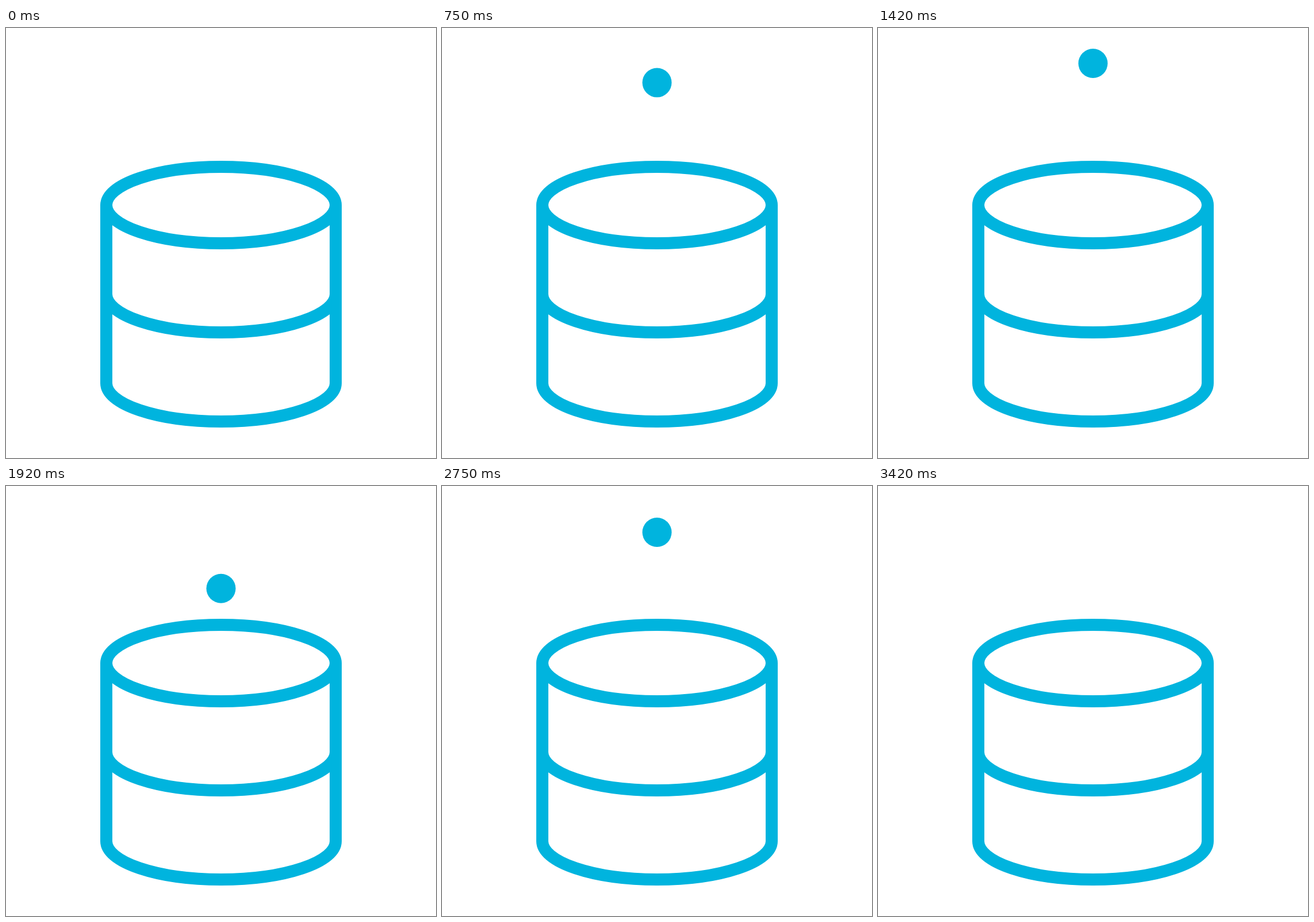
An HTML page with a canvas for the animation above (3460 ms loop, 748 px wide and 748 px high).

```html
<!DOCTYPE html>
<html lang="en">
<head>
<meta charset="utf-8">
<title>Database filling</title>
<style>
  html, body { margin: 0; width: 100%; height: 100%; overflow: hidden; background: #fff; }
  canvas { display: block; width: 748px; height: 748px; }
</style>
</head>
<body>
<canvas id="stage" width="748" height="748"></canvas>
<script>
const ctx = document.getElementById('stage').getContext('2d');
const BLUE = '#00b4de';
const LOOP = 3460;
const TICK = 1000 / 24;
const CX = 374, RX = 199.5, RY = 66.5;
const TOP = 308, MIDDLE = 463, BOTTOM = 618;
const DOT = { y: 61.5, radius: 25.5, travel: 205, fallSteps: 14.7 };

// Times are in animation steps, about 20 per second.
const DROPS = [
  { appear: 4.4, fall: 11.1 },
  { appear: 24, fall: 31 },
  { appear: 44.8, fall: 52.1 }
];
const FADE_STEPS = 4.9;

const clamp = v => Math.min(1, Math.max(0, v));
const easeInOut = p => (1 - Math.cos(Math.PI * p)) / 2;

// 20 steps per second, held on a 24 per second clock.
function stepAt(ms) {
  const tick = Math.floor((ms + 4.9) / TICK);
  return Math.floor(tick * 5 / 6 + 0.75);
}

function drawDrop(drop, step) {
  const alpha = clamp((step - drop.appear) / FADE_STEPS);
  const progress = clamp((step - drop.fall) / DOT.fallSteps);
  if (alpha === 0 || progress === 1) return;
  ctx.globalAlpha = alpha;
  ctx.fillStyle = BLUE;
  ctx.beginPath();
  ctx.arc(CX, DOT.y + DOT.travel * easeInOut(progress), DOT.radius, 0, 2 * Math.PI);
  ctx.fill();
  ctx.globalAlpha = 1;
}

function drawCylinder() {
  ctx.strokeStyle = BLUE;
  ctx.lineWidth = 21;
  ctx.fillStyle = '#fff';

  ctx.beginPath();
  ctx.ellipse(CX, TOP, RX, RY, 0, 0, 2 * Math.PI);
  ctx.fill();
  ctx.stroke();

  ctx.beginPath();
  ctx.moveTo(CX + RX, TOP);
  ctx.lineTo(CX + RX, BOTTOM);
  ctx.ellipse(CX, BOTTOM, RX, RY, 0, 0, Math.PI);
  ctx.lineTo(CX - RX, TOP);
  ctx.stroke();

  ctx.beginPath();
  ctx.ellipse(CX, MIDDLE, RX, RY, 0, 0, Math.PI);
  ctx.stroke();
}

function render(ms) {
  const step = stepAt(ms);
  ctx.fillStyle = '#fff';
  ctx.fillRect(0, 0, 748, 748);
  for (const drop of DROPS) drawDrop(drop, step);
  drawCylinder();
}

let start;
function loop(now) {
  start ??= now;
  render(Math.max(0, now - start) % LOOP);
  requestAnimationFrame(loop);
}
render(0);
requestAnimationFrame(loop);
</script>
</body>
</html>
```
